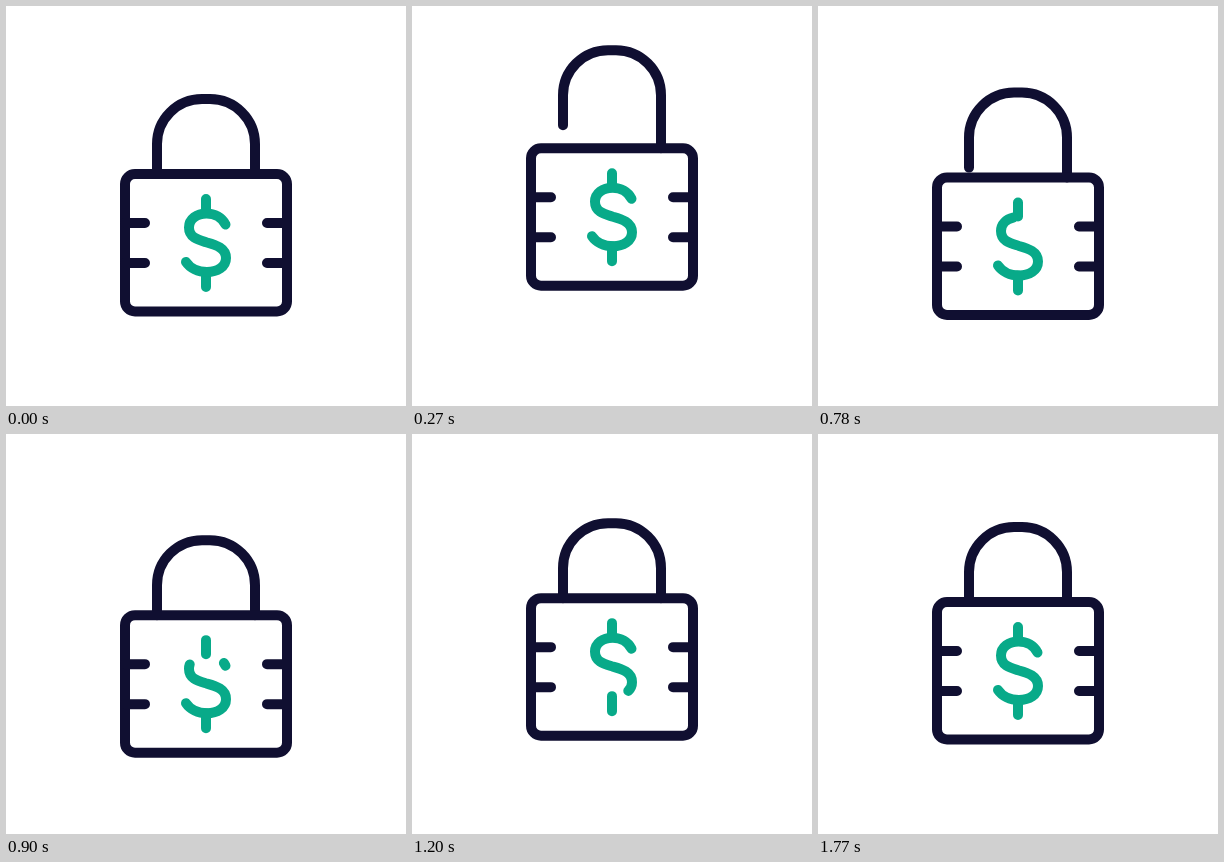
Animation of 400 by 400 pixels, one loop 3860 ms. Source, as an HTML page:

```html
<!DOCTYPE html>
<html lang="en">
<head>
<meta charset="utf-8">
<title>Lock</title>
<style>
  html, body { margin: 0; width: 100%; height: 100%; overflow: hidden; background: #fff; }
  svg { display: block; width: 100%; height: 100%; }
  path, rect { fill: none; stroke-width: 10; stroke-linecap: round; stroke-linejoin: round; }
  .ink { stroke: #100f31; }
  .money { stroke: #08aa89; }
</style>
</head>
<body>
<svg viewBox="0 0 400 400">
  <path id="shackle" class="ink"/>
  <g id="body">
    <rect class="ink" x="119" y="168" width="162" height="137.5" rx="10"/>
    <path class="ink" d="M119 217h20M119 257h20M281 217h-20M281 257h-20"/>
    <path class="money" d="M200 193v14M200 266v15"/>
    <path id="head" class="money" pathLength="100"/>
    <path id="tail" class="money" pathLength="100"/>
  </g>
</svg>
<script>
  const LOOP = 3860, STEP = 30, LAST = 1770, GAP = 27;
  const [shackle, body, head, tail] =
    ['shackle', 'body', 'head', 'tail'].map(id => document.getElementById(id));

  const curve = 'M219.5 218.5C216 211.5 208.6 207.5 200.5 207.5' +
    'C191 207.5 183 213 183 221.5C183 232 193 234 201 236.5' +
    'C210 239 220 242 220 252C220 261 211 266 201 266C192 266 184 262 180 256';
  head.setAttribute('d', curve);
  tail.setAttribute('d', curve);

  const linear = p => p;
  const smooth = p => p * p * (3 - 2 * p);

  // keys are [time, value] pairs in order of time
  function track(keys, t, ease = smooth) {
    const i = keys.findIndex(k => k[0] > t);
    if (i < 0) return keys[keys.length - 1][1];
    if (i === 0) return keys[0][1];
    const [t0, v0] = keys[i - 1], [t1, v1] = keys[i];
    return v0 + (v1 - v0) * ease((t - t0) / (t1 - t0));
  }

  const jump = [[0, 0], [60, 13.5], [340, -33], [570, -33], [870, 13.5], [1230, -4.2], [1470, 0]];
  const lift = [[150, 0], [360, -38], [600, -38], [870, 0]];
  const gap = [[570, 0], [870, GAP], [1470, GAP], [1770, 0]];
  const travel = [[870, 0], [1170, 100 - GAP]];

  function dash(el, from, to) {
    el.style.display = to > from ? '' : 'none';
    el.setAttribute('stroke-dasharray', `${to - from} 200`);
    el.setAttribute('stroke-dashoffset', -from);
  }

  function draw(t) {
    const y = track(jump, t), top = 93 + y + track(lift, t);
    body.setAttribute('transform', `translate(0 ${y})`);
    shackle.setAttribute('d',
      `M151 ${top + 75}v-30a45 45 0 0 1 45 -45h8a45 45 0 0 1 45 45V${168 + y}`);

    const width = track(gap, t, linear);
    const start = t < 1470 ? track(travel, t) : 100 - width;
    const end = t < 1170 ? start + width : 100;
    dash(head, 0, start);
    dash(tail, end, 100);
  }

  const begin = performance.now();
  function tick() {
    const t = (performance.now() - begin) % LOOP;
    draw(Math.min(LAST, Math.floor(t / STEP) * STEP));
    requestAnimationFrame(tick);
  }
  tick();
</script>
</body>
</html>
```
